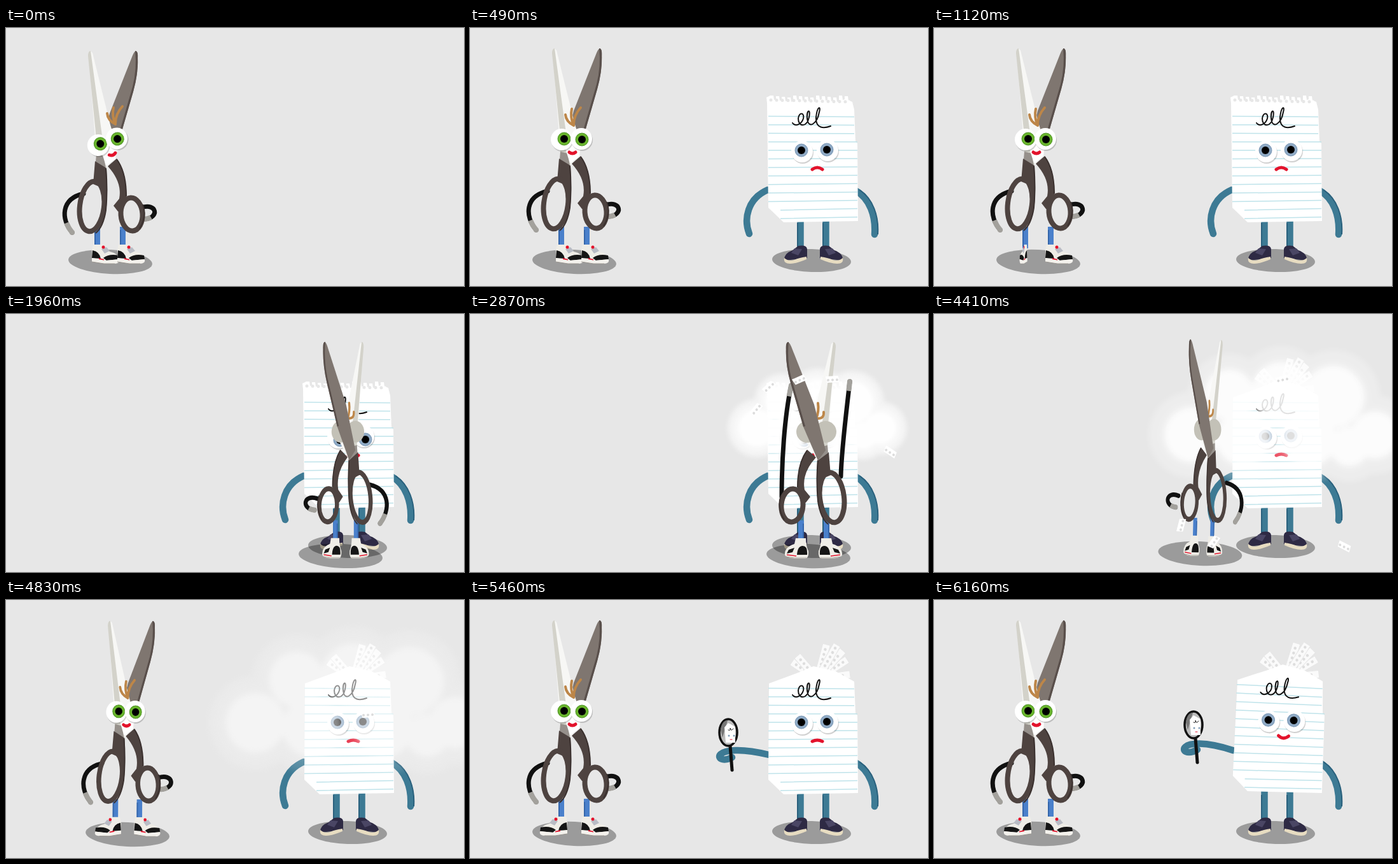
Recreate the animation shown at these times as an HTML page. Size 720 by 405 pixels, loop 6300 ms.

```html
<!DOCTYPE html>
<html lang="en">
<head>
<meta charset="utf-8">
<title>Scissors and paper</title>
<style>
html, body { margin: 0; height: 100%; overflow: hidden; background: #e7e7e7; }
svg { display: block; width: 100vw; height: 100vh; }
.line { fill: none; stroke-linecap: round; stroke-linejoin: round; }
.teal { stroke: #3d7a94; stroke-width: 10.5; }
.shade { fill: none; stroke: #2a617d; stroke-width: 2; }
.black { stroke: #111; }
.red { stroke: #e3132c; stroke-width: 5; }
.hair { stroke: #bd8648; stroke-width: 4; }
.grip { fill: #4e4340; }
.ring { fill: none; stroke: #4e4340; stroke-width: 8; }
.edge { fill: none; stroke: #3a302e; stroke-width: 2; }
.flat { stroke-linecap: butt; }
</style>
</head>
<body>
<svg viewBox="0 0 720 405">
<defs>
  <filter id="soft" x="-20%" y="-20%" width="140%" height="140%"><feGaussianBlur stdDeviation="3"/></filter>
  <g id="shoe">
    <path fill="#efede7" d="M-9 348L-7 340 8 340 19 351Q34 354 34 366H-9z"/>
    <path fill="#b9bcc5" d="M6 347l8-3 5 6-8 4z"/>
    <path fill="#151515" d="M9 361Q18 354 33 357L34 363 14 365zM-8 349Q3 351 5 362L-9 361z"/>
    <path fill="#e3132c" d="M2 361l8 2v2l-8-1z"/>
    <circle cx="9" cy="344" r="2.500" fill="#e3132c"/>
    <path fill="#f4f2ed" d="M-9 361L12 365 34 363Q36 370 26 370H10L-9 367z"/>
    <path fill="none" stroke="#99958f" d="M-9 367L10 370H27"/>
  </g>
  <g id="heel">
    <path fill="#efede7" d="M-8 340H8L10 349Q26 354 25 366 24 371 8 372H-7Q-13 371 -12 360 -8 352 -8 340z"/>
    <path fill="#151515" d="M-10 366Q-11 352 -3 352 5 352 6 366zM10 355l9 3 3 6-9-2z"/>
    <path fill="none" stroke="#e3132c" stroke-width="1.500" d="M7 368L22 366"/>
    <path fill="none" stroke="#99958f" d="M-9 371H10L23 369"/>
  </g>
  <g id="slip">
    <path fill="#2e2a44" d="M-9 347Q-8 340 5 342L14 349Q28 354 27 365L-9 361z"/>
    <path fill="#e7dcc1" d="M-8 359Q5 361 11 364 20 367 27 361 29 370 18 370 8 370 -8 363z"/>
    <path fill="#4a4664" d="M-1 347l12-1 5 7-11 4z"/>
  </g>
  <g id="lightBlade"><g class="turnA">
    <path fill="#f7f7f5" d="M130 37Q131 29 136 35L164 148 176 188 157 218 142 195z"/>
    <path fill="#d3d2ca" d="M129 40Q129 32 133 32L149 150 158 216 142 197 141 160z"/>
    <path fill="#96908b" d="M142 194l12 3 3 21-16-12z"/>
  </g></g>
  <g id="darkBlade"><g class="turnB">
    <path fill="#7f7670" d="M199 39Q204 27 207 36 209 64 200 96L180 165 157 218 145 202 163 130z"/>
    <path fill="#594f4b" d="M203 32Q208 31 207 44 208 68 200 96L180 165 177 164 199 88Q206 60 203 32z"/>
  </g></g>
  <g id="handles">
    <g class="turnB">
      <path class="grip" d="M140 205L158 216Q160 250 157 282L151 268 149 246 137 241z"/>
      <ellipse class="ring" cx="135" cy="276" rx="19" ry="39.500" transform="rotate(7 135 276)"/>
      <path class="edge" d="M157 217Q160 250 157 282 153 308 141 318"/>
    </g>
    <g class="turnA">
      <path class="grip" d="M160 213L174 201Q190 222 189 262L180 284 176 284 169 275 178 264Q183 238 160 213z"/>
      <ellipse class="ring" cx="197.500" cy="288.500" rx="17" ry="26" transform="rotate(-4 197 288)"/>
      <path class="edge" d="M174 202Q189 222 189 260M215 273Q222 291 210 311"/>
    </g>
  </g>
</defs>
<rect width="720" height="405" fill="#e7e7e7"/>

<g id="paper">
  <ellipse cx="537" cy="365" rx="62" ry="18" opacity=".33" transform="rotate(2 537 365)"/>
  <path class="line teal flat" d="M519.500 295V346M559.500 295V346"/>
  <path class="shade" d="M515 306V343M555 306V343"/>
  <use href="#slip" transform="translate(521) scale(-1 1)"/>
  <use href="#slip" transform="translate(559)"/>
  <path class="line teal" d="M606 255C629 268 638 296 636 324"/>
  <path class="shade" d="M612 254C634 268 643 296 641 324"/>
  <path class="line teal" id="paperArm"/>
  <g id="mirror">
    <path class="line black" stroke-width="5" d="M-3 -18L0 20"/>
    <ellipse class="black" cx="-6" cy="-39" rx="14" ry="21" fill="#bdbdbd" stroke-width="3.500"/>
    <path fill="#777" d="M-18 -43Q-16 -58 -7 -58L-15 -31z"/>
    <path fill="#fff" d="M-12 -47l6-7 11 6v25H-10z"/>
    <path class="line black" stroke-width="1" d="M-6 -43q4 2 3-3 1 6 5 1"/>
    <path class="line" stroke="#7f9db8" stroke-width="3" d="M-5 -34h0M3 -34h0"/>
    <path class="line" stroke="#e3132c" d="M-3 -28h3"/>
  </g>
  <g id="sheet">
    <g id="strips"></g>
    <path id="outline" fill="#fff"/>
    <path id="holes" class="line" stroke="#e7e7e7" stroke-width="5" stroke-dasharray="0 9" d="M473 113L598 116"/>
    <path id="rules" fill="none" stroke="#bfe3ea" stroke-width="1.500"/>
    <path class="line black" stroke-width="2" d="M507 149C512 156 522 150 524 142 526 132 517 132 516 142 516 156 530 156 533 140 536 126 529 128 530 142 532 160 546 150 549 132 552 122 546 122 544 140 543 158 556 158 567 154"/>
    <g id="paperEyes"></g>
    <path class="line red" id="paperMouth"/>
  </g>
</g>

<g id="cloud" fill="#fff"></g>

<ellipse id="shadow" cx="164" cy="367" rx="66" ry="19" opacity=".33"/>
<g id="scissors">
  <path class="line flat" stroke="#4a80cb" stroke-width="9" d="M143.500 312V346M183.500 312V346"/>
  <path stroke="#3566ab" stroke-width="2" d="M140 317V343M180 317V343"/>
  <g id="frontShoes"><use href="#shoe" id="turningShoe"/><use href="#shoe" transform="translate(184)"/></g>
  <g id="backShoes"><use href="#heel" transform="translate(144) scale(-1 1)"/><use href="#heel" transform="translate(184)"/></g>
  <g id="body">
    <g id="arms"></g>
    <g id="front">
      <use href="#darkBlade"/><use href="#lightBlade"/><use href="#handles"/>
      <path fill="#fff" d="M147 180H174L172 202 157 212z"/>
      <path id="fringe" class="line hair" d="M163 153Q151 147 150 136M163 153Q157 140 160 127M163 152Q163 137 174 125"/>
      <g id="face"></g>
    </g>
    <g id="back">
      <use href="#handles"/><use href="#lightBlade"/>
      <g fill="#c3c1b7"><circle cx="145" cy="173" r="17"/><circle cx="174" cy="173" r="17"/></g>
      <path class="line hair" d="M163 151Q147 155 148 142M160 153Q155 140 157 128"/>
      <use href="#darkBlade"/>
    </g>
  </g>
</g>
<g id="bits"></g>
</svg>
<script>
const LOOP = 6300, STEP = 70;
const $ = id => document.getElementById(id);
const set = (id, attrs) => { for (const k in attrs) $(id).setAttribute(k, attrs[k]); };
const setAll = (selector, transform) =>
  document.querySelectorAll(selector).forEach(g => g.setAttribute("transform", transform));
const show = (id, on) => { $(id).style.display = on ? "" : "none"; };
const part = (t, a, b) => Math.min(1, Math.max(0, (t - a) / (b - a)));
const ease = (t, a, b) => { const u = part(t, a, b); return u * u * (3 - 2 * u); };
const mix = (a, b, u) => a.map((v, i) => v + (b[i] - v) * u);
const curve = ([x, y, ...rest]) => `M${x} ${y}C${rest}`;

const eye = (x, y, dx, dy, color, rim) =>
  `<circle cx="${x + 1}" cy="${y + 2}" r="17" fill="#000" opacity=".18"/>
   <circle cx="${x}" cy="${y}" r="17" fill="#fff"/>
   <g class="iris"><circle cx="${x + dx}" cy="${y + dy}" r="10" fill="${color}" stroke="${rim}"/>
   <circle cx="${x + dx}" cy="${y + dy}" r="6"/></g>`;

$("face").innerHTML = eye(144, 175, 4, -1, "#69b42d", "#4c9422") + eye(175, 174, 1, 1, "#69b42d", "#4c9422") +
  `<path class="line red" d="M156 195Q161 199 166 195"/>`;
$("paperEyes").innerHTML = eye(522, 194, -1, -2, "#8faac5", "#7a98b6") + eye(562, 192, -1, -1, "#8faac5", "#7a98b6");

$("strips").innerHTML = [[-56, 48], [-41, 48], [57, 56], [42, 60], [82, 52], [15, 56], [30, 62]].map(([a, h]) =>
  `<g transform="translate(546 124) rotate(${a})">
   <path fill="#fafafa" stroke="#e6e6e6" d="M-6 0V${-h}H6V0z"/>
   <path class="line" stroke="#dedede" stroke-width="4.500" stroke-dasharray="0 8" d="M0 -8V${5 - h}"/></g>`).join("");

const SHEET = "L604 128 606 178 609 181 610 303 493 305 469 282z";
let torn = "M467 118L466 109 ";
for (let x = 472; x < 590; x += 9) torn += `L${x} ${106 + x % 4}h5l1 7 3-1`;
const OUTLINES = [torn + "L594 113 601 116" + SHEET, "M470 131L516 114 540 104 575 112" + SHEET];
let rules = "";
for (let i = 0; i < 13; i++) {
  const y = 138.5 + 13.4 * i;
  rules += `M${i > 10 ? 488 : 469} ${y}L${i < 3 ? 604 : 609} ${y + 1 - .3 * i}`;
}
set("rules", { d: rules });

const PUFFS = [[-95, 22, 46], [-55, -20, 44], [0, -24, 48], [55, -18, 50], [99, 22, 42], [-40, 26, 46], [30, 26, 46], [72, 34, 38]];
const puffs = (grow, alpha) => `<g opacity="${alpha}" filter="url(#soft)">` +
  PUFFS.map(([x, y, r]) => `<circle cx="${x}" cy="${y}" r="${r + grow}"/>`).join("") + "</g>";
$("cloud").innerHTML = `<g id="halo">${puffs(0, .5)}${puffs(-8, .4)}</g>` + puffs(-17, .97);

// Flying scraps: launch time, horizontal speed in px/s
const BITS = [[2200, 180], [2380, -184], [2540, -212], [2670, -110], [2700, 176], [2960, -150], [3080, 190],
  [3250, 60], [3380, -200], [3480, 113], [3490, -109], [3530, -172], [4250, 50]];
$("bits").innerHTML = BITS.map(() =>
  `<g><path fill="#fff" d="M-11 -5H9L11 5H-9z"/>
   <path class="line" stroke="#dcdcdc" stroke-width="4" stroke-dasharray="0 7" d="M-7 1H9"/></g>`).join("");

const ARMS = [
  { down: [122, 256, 86, 264, 86, 296, 104, 317], up: [121, 243, 120, 200, 112, 140, 107, 94] },
  { down: [213, 278, 237, 270, 242, 294, 218, 296], up: [214, 275, 214, 220, 210, 150, 199, 100] }
];
const PAPER_ARM = {
  down: [468, 254, 436, 268, 430, 300, 439, 323],
  up: [470, 243, 375, 220, 382, 262, 412, 247],
  near: [470, 236, 377, 206, 382, 252, 414, 235]
};

function drawPaper(t) {
  const u = part(t, 140, 490) - 1;
  const pop = Math.max(0, 1 + 2.7 * u ** 3 + 1.7 * u ** 2);
  show("paper", t >= 140);
  set("paper", { transform: `translate(537 366) scale(${pop}) translate(-537 -366)` });

  const cut = t > 3200, happy = ease(t, 5630, 6020), raise = ease(t, 4970, 5320);
  set("outline", { d: OUTLINES[+cut] });
  show("holes", !cut);
  show("strips", cut);
  set("sheet", { transform: `translate(0 ${-3 * happy}) rotate(${2.4 * happy} 540 300)` });
  const base = 222 - 6 * happy, bend = (cut ? 218 : 216) + 5 * happy;
  set("paperMouth", { d: `M538 ${base}Q546 ${bend} 554 ${base}` });
  const gaze = ease(t, 1540, 1890) - ease(t, 3200, 3500);
  setAll("#paperEyes .iris", `translate(${4 * gaze} ${6 * gaze})`);

  const arm = mix(mix(PAPER_ARM.down, PAPER_ARM.up, raise), PAPER_ARM.near, happy);
  set("paperArm", { d: curve(arm) });
  show("mirror", raise > 0);
  set("mirror", { transform: `translate(${arm[6]} ${arm[7]}) scale(${raise})` });
}

function drawCloud(t) {
  const size = ease(t, 2140, 2560) * (138 + (t - 2800) * .0443) / 141;
  const alpha = 1 - part(t, 4270, 5250);
  show("cloud", t > 2140 && alpha > 0);
  set("cloud", { transform: `translate(546 157) scale(${size})`, opacity: alpha ** .7 });
  set("halo", { opacity: 1 - .5 * part(t, 3500, 4400) });
}

function drawScissors(t) {
  const away = ease(t, 1470, 2000) - part(t, 4200, 4880);
  const angle = Math.PI * (part(t, 1470, 2080) - part(t, 4235, 4900));
  const facing = Math.cos(angle), isFront = facing > 0;
  const width = Math.max(.35, Math.abs(facing));
  const hop = 24 * Math.sin(Math.PI * part(t, 210, 490));
  const tilt = 1.6 * Math.sin(Math.PI * part(t, 4200, 4880));
  const lean = 1 - ease(t, 70, 490);

  set("shadow", { transform: `translate(${368 * away} ${13 * away}) rotate(3 164 367)` });
  set("scissors", { transform: `translate(${165 + 374 * away} ${12 * away - hop}) rotate(${tilt} 0 300) ` +
    `scale(${isFront ? width : -width} 1) translate(-165)` });
  set("body", { transform: `translate(0 ${4 * lean})` });
  set("face", { transform: `rotate(${-18 * lean} 160 175)` });
  set("fringe", { transform: `translate(${9 * lean} ${-6 * lean})` });
  set("turningShoe", { transform: `translate(144) scale(${1 - 2 * part(t, 910, 1240)} 1)` });
  for (const id of ["front", "frontShoes"]) show(id, isFront);
  for (const id of ["back", "backShoes"]) show(id, !isFront);

  const lift = ease(t, 2120, 2450) - ease(t, 3850, 4200);
  set("arms", { transform: `translate(165) scale(${width ** -.5} 1) translate(-165)` });
  $("arms").innerHTML = ARMS.map(({ down, up }) => {
    const d = curve(mix(down, up, lift));
    return `<path class="line black" stroke-width="7" d="${d}"/>
      <path fill="none" stroke="#a3a19c" stroke-width="8" pathLength="100" stroke-dasharray="0 ${78 + 12 * lift} 30" d="${d}"/>
      <path class="line" stroke="#a3a19c" stroke-width="8" d="M${d.split(",").slice(-2)}h0"/>`;
  }).join("");

  const chop = t > 2170 && t < 4150 ? 9 * Math.sin(Math.PI * (t - 2870) / 280) ** 2 : 0;
  setAll(".turnA", `rotate(${chop} 157 214)`);
  setAll(".turnB", `rotate(${-chop} 157 214)`);
}

function drawBits(t) {
  BITS.forEach(([start, speed], i) => {
    const s = (t - start) / 1000, g = $("bits").children[i];
    g.style.display = s > 0 && s < .94 ? "" : "none";
    g.setAttribute("transform", `translate(${540 + speed * s} ${115 - 150 * s + 450 * s * s}) rotate(${speed * s * .4 - 15})`);
  });
}

function frame() {
  const t = Math.floor(performance.now() % LOOP / STEP) * STEP;
  drawPaper(t);
  drawCloud(t);
  drawScissors(t);
  drawBits(t);
  requestAnimationFrame(frame);
}
frame();
</script>
</body>
</html>
```
